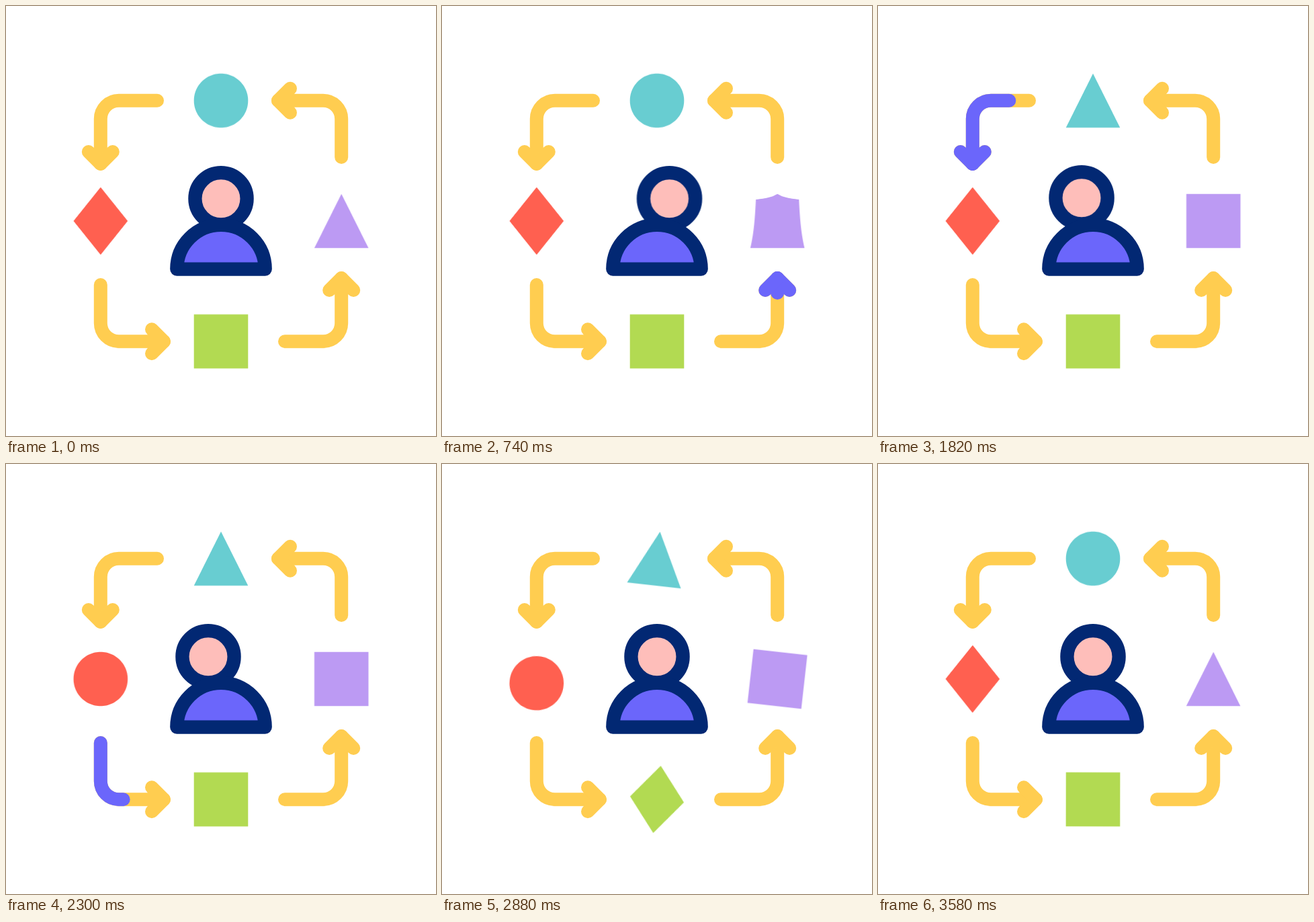
Write an HTML page that moves like this. It is 640 by 640 pixels and loops after 3.6 s.

```html
<!DOCTYPE html>
<html lang="en">
<head>
<meta charset="utf-8">
<title>Shape cycle</title>
<style>
html, body { margin: 0; width: 100%; height: 100%; overflow: hidden; background: #fff; }
svg { display: block; width: 100%; height: 100%; }

:root {
  --sine-in: cubic-bezier(.47, 0, .745, .715);
  --sine-out: cubic-bezier(.39, .575, .565, 1);
  --sine: cubic-bezier(.445, .05, .55, .95);
}
.person, .head, .shape, .dip { animation: 3600ms linear infinite; }

/* person */
.outline { stroke: #022873; stroke-width: 20.3; stroke-linejoin: round; }
.person { animation-name: nod; }
.head { animation-name: look; }
@keyframes nod {
  0% { transform: translateY(0); animation-timing-function: var(--sine-out); }
  3.472% { transform: translateY(-3.5px); animation-timing-function: var(--sine); }
  10.417% { transform: translateY(3.5px); animation-timing-function: var(--sine-in); }
  13.889%, 100% { transform: translateY(0); }
}
@keyframes look {
  0%, 15% { transform: translate(0, 0); animation-timing-function: var(--sine); }
  22%, 29.4% { transform: translate(19px, 0); animation-timing-function: var(--sine); }
  38.9%, 45.8% { transform: translate(0, -10.5px); animation-timing-function: var(--sine); }
  53.6%, 64.5% { transform: translate(-19px, 0); animation-timing-function: var(--sine); }
  72.2%, 100% { transform: translate(0, 0); }
}

/* arrows */
.arrow { fill: none; stroke: #ffcd50; stroke-width: 20; stroke-linecap: round; stroke-linejoin: round; }
.flow { stroke: #6b66fb; }
.flow path { visibility: hidden; animation: 3600ms linear var(--at) infinite; }
.flow .shaft { animation-name: shaft; }
.flow .wing { animation-name: wing; }
@keyframes shaft {
  0% { visibility: visible; stroke-dasharray: 0 400; stroke-dashoffset: 0; }
  4.833%, 5.556% { stroke-dasharray: 166.7 400; stroke-dashoffset: 0; }
  10.389%, 11.11% { visibility: visible; stroke-dasharray: 166.7 400; stroke-dashoffset: -166.7; }
  11.12%, 100% { visibility: hidden; stroke-dasharray: 166.7 400; stroke-dashoffset: -166.7; }
}
@keyframes wing {
  0%, 4.82% { visibility: hidden; stroke-dasharray: 0 99; stroke-dashoffset: 0; }
  4.833% { visibility: visible; stroke-dasharray: 0 99; stroke-dashoffset: 0; }
  5.556%, 10.389% { stroke-dasharray: 25.5 99; stroke-dashoffset: 0; }
  11.11% { visibility: visible; stroke-dasharray: 25.5 99; stroke-dashoffset: -25.5; }
  11.12%, 100% { visibility: hidden; stroke-dasharray: 25.5 99; stroke-dashoffset: -25.5; }
}

/* shapes */
.right { animation-name: wiggle, morph-right; fill: #bc9af3; }
.top { animation-name: wiggle, morph-top; fill: #68cdd1; }
.left { animation-name: wiggle, morph-left; fill: #ff6050; }
.bottom { animation-name: wiggle, morph-bottom; fill: #b2da52; }
.dip.early { animation-name: dip-early; }
.dip.late { animation-name: dip-late; }
@keyframes wiggle {
  0%, 72.222% { transform: rotate(0deg); animation-timing-function: var(--sine-out); }
  75.694%, 89.583% { transform: rotate(-8deg); animation-timing-function: var(--sine); }
  82.639% { transform: rotate(8deg); animation-timing-function: var(--sine); }
  96.528% { transform: rotate(8deg); animation-timing-function: var(--sine-in); }
  100% { transform: rotate(0deg); }
}
@keyframes dip-early {
  0%, 72.222% { transform: translateY(0); animation-timing-function: var(--sine); }
  79.167% { transform: translateY(7.25px); animation-timing-function: var(--sine); }
  86.111%, 100% { transform: translateY(0); }
}
@keyframes dip-late {
  0%, 86.111% { transform: translateY(0); animation-timing-function: var(--sine); }
  93.056% { transform: translateY(7.25px); animation-timing-function: var(--sine); }
  100% { transform: translateY(0); }
}
@keyframes morph-right {
  0%, 17.5% { d: var(--triangle); }
  21.944%, 84.722% { d: var(--square); }
  87.5%, 100% { d: var(--triangle); }
}
@keyframes morph-top {
  0%, 34.167% { d: var(--circle); }
  38.611%, 84.722% { d: var(--triangle); }
  87.5%, 100% { d: var(--circle); }
}
@keyframes morph-left {
  0%, 50.833% { d: var(--diamond); }
  55.278%, 84.722% { d: var(--circle); }
  87.5%, 100% { d: var(--diamond); }
}
@keyframes morph-bottom {
  0%, 67.5% { d: var(--square); }
  71.944%, 84.722% { d: var(--diamond); }
  87.5%, 100% { d: var(--square); }
}
</style>
<script>
// Each outline is a radius by direction, so any two can blend point by point.
const R = 40.3;
const outlines = {
  circle: () => R,
  square: (c, s) => R / Math.max(Math.abs(c), Math.abs(s)),
  diamond: (c, s) => R / (Math.abs(c) + Math.abs(s) * 0.8),
  triangle: (c, s) => R / Math.max(s, 2 * Math.abs(c) - s)
};
for (const [name, radius] of Object.entries(outlines)) {
  const points = Array.from({ length: 120 }, (_, i) => {
    const a = i * Math.PI / 60, c = Math.cos(a), s = Math.sin(a), r = radius(c, s);
    return `${(r * c).toFixed(2)} ${(r * s).toFixed(2)}`;
  });
  document.documentElement.style.setProperty(`--${name}`, `path("M${points.join("L")}Z")`);
}
</script>
</head>
<body>
<svg viewBox="0 0 640 640">
  <defs>
    <g id="arrow">
      <path d="M225 140.8H168A27.2 27.2 0 0 0 140.8 168V235"/>
      <path d="M122.8 217L140.8 235L158.8 217"/>
    </g>
  </defs>

  <g class="arrow">
    <use href="#arrow"/>
    <use href="#arrow" transform="rotate(90 320 320)"/>
    <use href="#arrow" transform="rotate(180 320 320)"/>
    <use href="#arrow" transform="rotate(270 320 320)"/>
  </g>
  <g class="arrow" id="flows"></g>

  <g transform="translate(499.2 320)"><path class="shape right"/></g>
  <g transform="translate(320 140.8)"><g class="dip late"><path class="shape top"/></g></g>
  <g transform="translate(140.8 320)"><g class="dip early"><path class="shape left"/></g></g>
  <g transform="translate(320 499.2)"><path class="shape bottom"/></g>

  <g class="person outline">
    <circle class="head" cx="320" cy="286.8" r="38.6" fill="#febeba"/>
    <path d="M254.3 391.6A65.7 65.7 0 0 1 385.7 391.6Z" fill="#6b66fb"/>
  </g>
</svg>
<script>
const turns = [180, 90, 0, 270];
document.getElementById("flows").innerHTML = turns.map((turn, i) => `
  <g class="flow" style="--at:${390 + 600 * i}ms" transform="rotate(${turn} 320 320)">
    <path class="shaft" d="M225 140.8H168A27.2 27.2 0 0 0 140.8 168V235"/>
    <path class="wing" d="M140.8 235L122.8 217"/>
    <path class="wing" d="M140.8 235L158.8 217"/>
  </g>`).join("");
</script>
</body>
</html>
```
